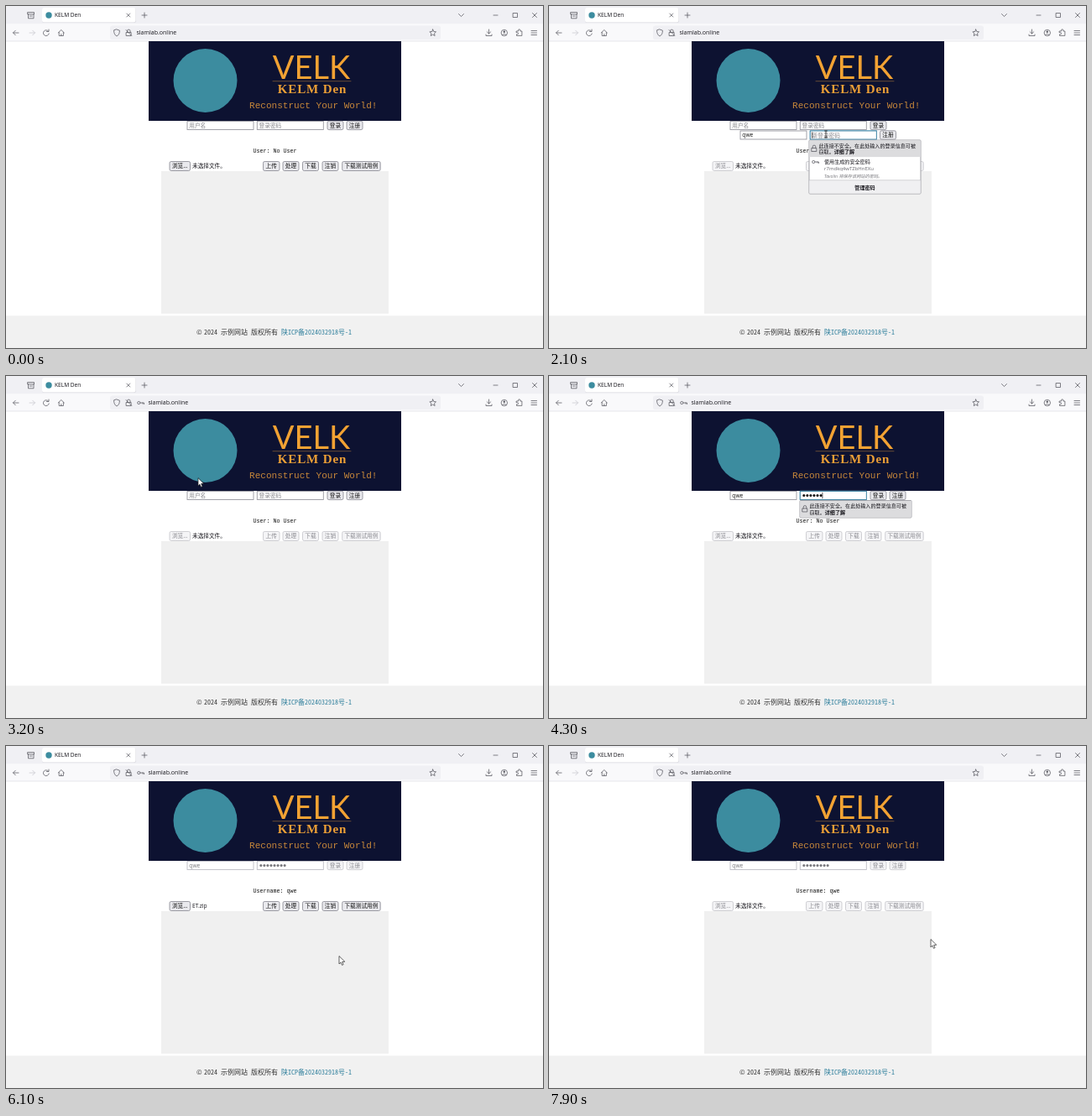
Write an HTML page that moves like this. It is 640 px wide and 408 px high and loops after 8 s.

```html
<!DOCTYPE html>
<html lang="zh-CN">
<head>
<meta charset="utf-8">
<style>
html, body { margin: 0; width: 100%; height: 100%; overflow: hidden; background: #fff; }
svg { display: block; width: 640px; height: 408px; }
text { font-family: "Open Sans", "Noto Sans CJK SC", "Noto Sans CJK", sans-serif; white-space: pre; }
.mono { font-family: "Liberation Mono", monospace; }
.half { font-family: "Noto Sans Mono CJK SC", "Noto Sans CJK SC", "Noto Sans CJK", monospace; }
.serif { font-family: "Liberation Serif", serif; letter-spacing: .9px; }
.title { font-family: Lato, sans-serif; }
</style>
</head>
<body>
<svg viewBox="0 0 640 408"><g id="page"></g><g id="live"></g></svg>
<script>
const LOOP = 8000, STEP = 100, SIZE = 6.67;
const USER = 'qwe', SITE = 'KELM Den', HOST = 'slamlab.online', FILE = 'ET.zip';
const INK = '#56565e';

const rect = (x, y, w, h, fill, extra = '') =>
  `<rect x="${x}" y="${y}" width="${w}" height="${h}" fill="${fill}" ${extra}/>`;
const text = (s, x, y, size = SIZE, fill = '#15141a', extra = '') =>
  `<text x="${x}" y="${y}" font-size="${size}" fill="${fill}" ${extra}>${s}</text>`;
const line = (d, color = INK, width = .75, fill = 'none') =>
  `<path d="${d}" stroke="${color}" stroke-width="${width}" fill="${fill}" stroke-linecap="round" stroke-linejoin="round"/>`;
const circle = (x, y, r, fill, extra = '') =>
  `<circle cx="${x}" cy="${y}" r="${r}" fill="${fill}" ${extra}/>`;
const ring = (x, y, r) => circle(x, y, r, 'none', `stroke="${INK}" stroke-width=".75"`);
const middle = 'text-anchor="middle"';
const within = (t, from, to) => t >= from && t < to;

const lock = (x, y) => line(`M${x - 2.8} ${y - .5}h5.6v4h-5.6zM${x - 1.8} ${y - .5}v-1.6a1.8 1.8 0 0 1 3.6 0v1.6`);
const keyIcon = (x, y) => ring(x - 2.2, y, 1.6) + line(`M${x - .6} ${y}h4.6v1.5M${x + 2.4} ${y}v1.2`);

function button(label, x, y, w, h, enabled = true, pressed = false) {
  const fill = pressed ? '#b1b1b9' : enabled ? '#e9e9ed' : '#f4f4f6';
  const edge = enabled ? '#85858f' : '#c4c4ca';
  return rect(x, y, w, h, fill, `rx="1.8" stroke="${edge}" stroke-width=".8"`) +
    text(label, x + w / 2, y + h / 2 + 2.4, SIZE, enabled ? '#111' : '#8a8a90', middle);
}

function input(x, y, { hint = '', value = '', dots = 0, focus = false, enabled = true }) {
  const ink = enabled ? '#111' : '#77777c';
  const edge = focus ? '#3a7f9f' : enabled ? '#97979f' : '#bcbcc4';
  let s = focus ? rect(x - .7, y - .7, 80.4, 11.4, '#8cc4dd', 'rx="1"') : '';
  s += rect(x, y, 79, 10, '#fff', `stroke="${edge}" stroke-width=".9"`);
  s += value ? text(value, x + 2.3, y + 7.4, SIZE, ink)
    : dots ? '' : text(hint, x + 2.3, y + 7.5, SIZE, '#85858a');
  for (let i = 0; i < dots; i++) s += circle(x + 4.5 + i * 4.05, y + 5, 1.5, ink);
  if (focus) {
    const cx = x + 2.3 + (value ? value.length * 3.7 : dots * 4.05);
    s += line(`M${cx} ${y + 1.8}v6.6`, '#111', .7);
  }
  return s;
}

function warning(x, y, full) {
  let s = rect(x, y, 133, full ? 64 : 20.5, '#fff', 'rx="1" stroke="#97979d" stroke-width=".9"') +
    rect(x + .4, y + .4, 132.2, 19.7, '#dcdcde') + lock(x + 6, y + 10) +
    text('此连接不安全。在此处输入的登录信息可被', x + 11.5, y + 8.6, 6.08) +
    text('窃取。<tspan font-weight="700">详细了解</tspan>', x + 11.5, y + 16, 6.08);
  if (full) s += keyIcon(x + 7.5, y + 26) +
    text('使用生成的安全密码', x + 18, y + 28, 6.08) +
    text('r7mdkq4wTZbHnEXu', x + 18, y + 36.2, 6, '#66666c') +
    text('Tavolin 将保存该网站的密码。', x + 18, y + 44.6, 5.2, '#77777c', 'font-style="italic"') +
    rect(x + .4, y + 48, 132.2, 15.6, '#f0f0f2') + line(`M${x} ${y + 47.8}h133`, '#c4c4c9') +
    text('管理密码', x + 66.5, y + 58.5, 6.08, '#15141a', middle + ' font-weight="600"');
  return s;
}

const alertBox = message =>
  rect(0, 42, 640, 366, '#1c1b22', 'opacity=".5"') + rect(232, 200, 176, 50, '#fff', 'rx="3"') +
  text(HOST, 240, 211, SIZE, '#15141a', 'font-weight="600"') + text(message, 240, 223.5) +
  rect(372, 232.5, 28, 11.5, '#0061e0', 'rx="2"') + text('确定', 386, 240.7, SIZE, '#fff', middle);

function fileDialog() {
  return rect(4, 0, 471, 265, '#fff', 'stroke="#d0d0d4" stroke-width=".8"') +
    rect(4.4, .4, 470.2, 20, '#f3f3f5') + line('M463 8l5 5m0-5l-5 5') +
    line('M83 42V228M4 228H475', '#e2e2e6') +
    rect(103, 233, 252, 10, '#fff', 'stroke="#9a9aa2" stroke-width=".7"') + text(FILE, 106, 240.5) +
    button('打开', 377, 248, 42, 11) + button('取消', 425, 248, 42, 11);
}

function page() {
  let s = rect(0, 0, 640, 408, '#fff') + rect(0, 0, 640, 21.5, '#f0f0f4') +
    rect(0, 21.5, 640, 20.5, '#f9f9fb') + line('M0 42H640', '#dedee3', .7);
  // browser tabs and window controls
  s += rect(43, 2.4, 112, 17.6, '#d6d6dc', 'rx="2.5"') + rect(43, 2, 111.5, 17.4, '#fff', 'rx="2.5"') +
    circle(51, 11, 3.7, '#3c8c9f') + text(SITE, 58, 13.4, 6.6) +
    line('M143.8 9l4 4m0-4l-4 4M162 11h6m-3-3v6') +
    line('M26 7.5h7.5v2.3H26zM26.5 9.8v5h6.5v-5M28.2 12h3') +
    line('M539.5 9.5l3 3 3-3M581 11h5M604.5 8.5h5v5h-5zM627.5 8.5l5 5m0-5l-5 5');
  // toolbar
  s += rect(124, 23.5, 394, 16.5, '#f0f0f4', 'rx="2.5"') +
    line('M15 32H8.5l2.8-2.8M8.5 32l2.8 2.8') +
    line('M28 32h6.5l-2.8-2.8M34.5 32l-2.8 2.8', '#c6c6cc') +
    line('M50.5 30a3.4 3.4 0 1 0 .7 3M51 28v2.5h-2.5') +
    line('M62.2 32l3.6-3.5 3.6 3.5M63.2 31.5v4h5.2v-4M65.8 35.5v-2') +
    line('M132 28l3.4 1.2c0 3.5-1 5.5-3.4 6.8c-2.4-1.3-3.4-3.3-3.4-6.8z') +
    lock(146.3, 32) + line('M143 28.5l6.8 7', INK, .7) +
    line('M508.7 28l1.1 2.5 2.7.3-2 1.9.6 2.8-2.4-1.4-2.4 1.4.6-2.8-2-1.9 2.7-.3z') +
    line('M575.5 28v5m-2.3-2.2l2.3 2.2 2.3-2.2M572 34v1.5h7V34') +
    ring(593.8, 32, 3.7) + circle(593.8, 30.7, 1.2, INK) + line('M591.5 34.4q2.3-2.4 4.6 0') +
    line('M608.5 30h2v-1a1.2 1.2 0 0 1 2.4 0v1h2v5.4h-6.4v-1.6h1a1.1 1.1 0 0 0 0-2.2h-1z') +
    line('M626 29.5h6.5M626 32h6.5M626 34.5h6.5');
  // banner
  s += rect(170, 42, 301, 95, '#0d1231') + circle(237.5, 89, 38, '#3c8c9f') +
    text('VELK', 364, 87, 38, '#f2a233', middle + ' class="title"') + line('M318 89.7H411', '#8a6238', .7) +
    text(SITE, 365, 104, 15, '#eda036', middle + ' class="serif" font-weight="700"') +
    text('Reconstruct Your World!', 290, 121.7, 11.05, '#c8883a', 'class="mono"');
  // viewer and footer
  s += rect(185, 197, 271, 170, '#f0f0f0') + rect(0, 369.5, 640, 38.5, '#f1f1f1');
  const foot = (t, x, fill = '#333') => text(t, x, 391.8, 8, fill, 'class="half"');
  return s + foot('©', 227) + foot('2024', 236) + foot('示例网站', 256) + foot('版权所有', 292) +
    foot('陕ICP备2024032918号-1', 328, '#2f7f9c');
}

// pointer stops: time, x, y
const PATH = [
  [300, 470, 240], [700, 415, 141], [900, 415, 141], [1200, 262, 153], [1600, 262, 153],
  [1900, 330, 153], [2500, 330, 153], [2700, 403, 153], [2800, 403, 153], [3000, 386, 238],
  [3200, 229, 122], [3400, 232, 141], [4400, 320, 141], [4600, 392, 141], [4700, 392, 141],
  [4900, 386, 238], [5000, 386, 238], [5300, 212, 193], [5500, 212, 193], [5900, 397, 251],
  [6100, 397, 251], [6400, 316, 190], [6600, 316, 190], [6900, 386, 238], [7100, 386, 238],
  [7400, 455, 231], [7900, 455, 231]
];

function pointer(t) {
  if (t < PATH[0][0] || within(t, 3500, 4500)) return '';
  const i = Math.max(1, PATH.findIndex(p => p[0] >= t));
  const [t0, x0, y0] = PATH[i - 1], [t1, x1, y1] = PATH[i];
  const k = (t - t0) / (t1 - t0), e = k * k * (3 - 2 * k);
  const x = x0 + (x1 - x0) * e, y = y0 + (y1 - y0) * e;
  if (within(t, 1200, 2600)) return line(`M${x - 1.5} ${y - 4}h3M${x} ${y - 4}v8m-1.5 0h3`, '#222', .8);
  return line(`M${x} ${y}v9l2-1.8 1.5 3.2 1.6-.8-1.5-3 2.8-.3z`, '#222', .7, '#fff');
}

const typed = (t, start, gap, max) => Math.max(0, Math.min(max, Math.floor((t - start) / gap)));

function live(t) {
  const joining = within(t, 800, 3100), saved = t >= 2800, logged = t >= 5000;
  const active = t < 300 || within(t, 5000, 6500);
  const picked = within(t, 6000, 7100);
  let s = saved ? keyIcon(160.5, 32) : '';
  s += text(HOST, saved ? 169.5 : 155.5, 34.4, 7);

  s += input(216, 137.5, {
    hint: '用户名', value: USER.slice(0, typed(t, 3400, 100, 3)),
    focus: within(t, 3400, 3800), enabled: !logged
  });
  s += input(299.3, 137.5, {
    hint: '登录密码', dots: typed(t, 3700, 100, 8),
    focus: within(t, 3800, 4700), enabled: !logged
  });
  s += button('登录', 383, 137.3, 19, 10.3, !logged);
  if (joining) {
    s += input(228, 149, {
      hint: '新用户名', value: USER.slice(0, typed(t, 1300, 100, 3)), focus: within(t, 1200, 1900)
    }) + input(311.3, 149, {
      hint: '新登录密码', dots: typed(t, 2100, 60, 8), focus: within(t, 1900, 2800)
    }) + button('注册', 394.5, 148.8, 19, 10.3);
  } else s += button('注册', 406, 137.3, 19, 10.3, !logged);

  s += text(logged ? 'Username: ' + USER : 'User: No User', 294.5, 175.3, SIZE, '#111', 'class="mono"');
  s += button('浏览...', 195, 185.5, 24.5, 11, active, within(t, 5300, 5600)) +
    text(picked ? FILE : '未选择文件。', 222, 193.4, SIZE);
  [['上传', 306.5, 19.5], ['处理', 330, 19], ['下载', 353.5, 19], ['注销', 377, 19], ['下载测试用例', 400.7, 45.5]]
    .forEach(([label, x, w]) => s += button(label, x, 185.5, w, 11, active));

  if (within(t, 2000, 2700)) s += warning(310, 160, t < 2200);
  if (within(t, 3800, 4700)) s += warning(299, 148.5, false);
  if (within(t, 2800, 3100)) s += alertBox('注册成功');
  if (within(t, 4700, 5000)) s += alertBox('登录成功');
  if (within(t, 6600, 7100)) s += alertBox('上传成功');
  if (within(t, 5500, 6000)) s += fileDialog();
  return s + pointer(t);
}

const layer = document.getElementById('live');
document.getElementById('page').innerHTML = page();
let shown = -1;
function tick() {
  const t = Math.floor(performance.now() % LOOP / STEP) * STEP;
  if (t !== shown) layer.innerHTML = live(shown = t);
  requestAnimationFrame(tick);
}
tick();
</script>
</body>
</html>
```
